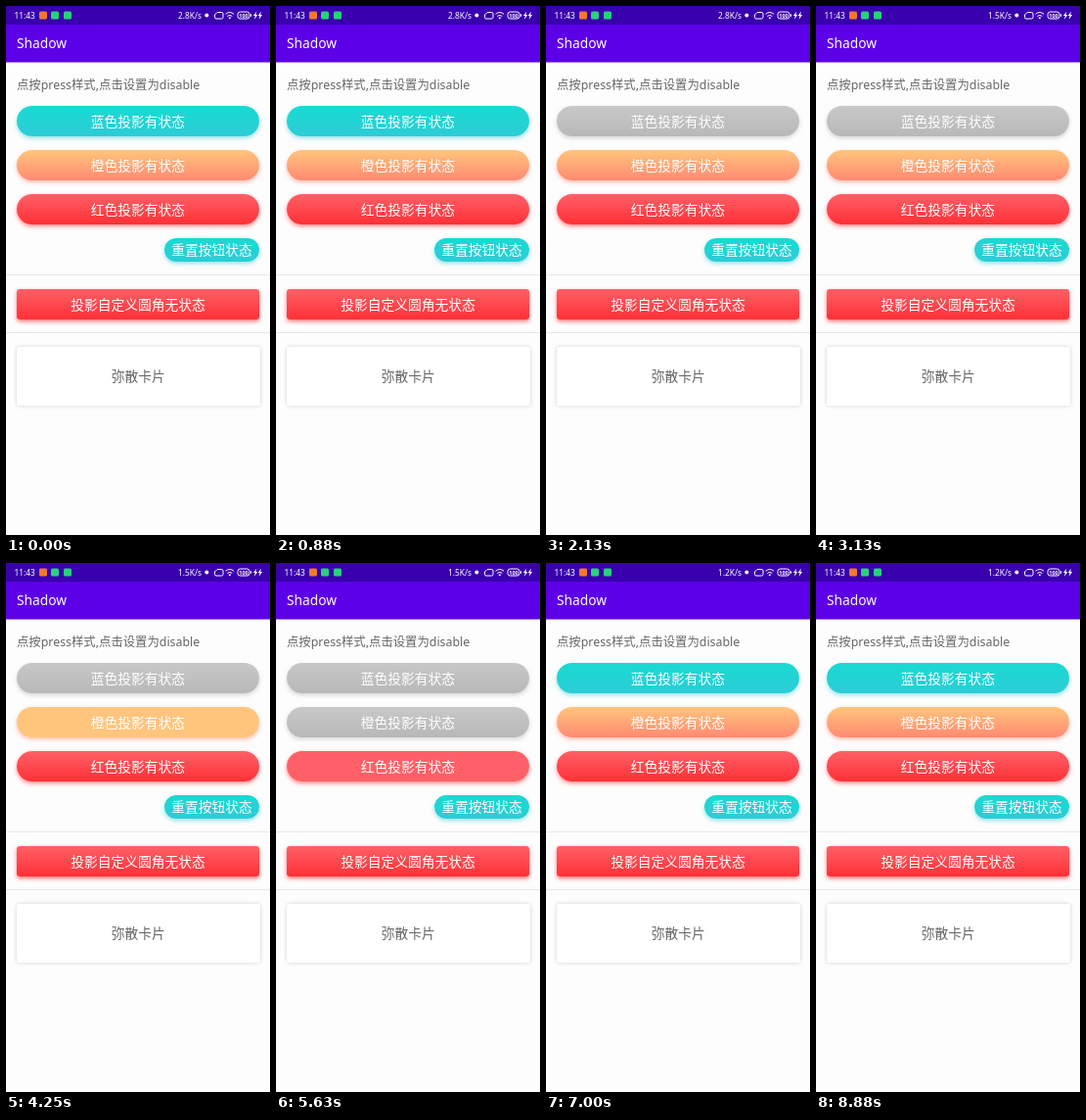
An HTML page for the animation above (9.01 s loop, 270x540 px).

```html
<!DOCTYPE html>
<html lang="zh-CN">
<head>
<meta charset="utf-8">
<title>Shadow</title>
<style>
  html, body { margin: 0; width: 100%; height: 100%; overflow: hidden; background: #fdfdfd; }
  body { position: relative; font-family: "Noto Sans", "Noto Sans CJK SC", "Noto Sans CJK", sans-serif; }
  svg, .box { position: absolute; }
  svg { left: 0; top: 0; }
  .box {
    box-sizing: border-box; text-align: center; white-space: nowrap;
    font-size: 13.75px; color: #fff;
    background: linear-gradient(var(--top), var(--bottom));
    box-shadow: 0 2px 4px var(--shadow);
  }
  .blue   { --top: #18dad2; --bottom: #2dccd6; --shadow: #2dccd680; }
  .orange { --top: #ffc57c; --bottom: #ff8a72; --shadow: #ff8a7290; }
  .red    { --top: #ff6067; --bottom: #ff3036; --shadow: #ff303690; }
  .square { --shadow: #ff3036b0; }
  .card   { --top: #fff; --bottom: #fff; color: #666; box-shadow: 0 0 4px #0000002e; }
  .pressed  { --bottom: var(--top); }
  .disabled { --top: #c8c8c8; --bottom: #b8b8b8; --shadow: #b8b8b890; }
</style>
</head>
<body>
<svg width="270" height="540" fill="#fff">
  <rect width="270" height="20" fill="#3900ae"/>
  <rect y="19" width="270" height="38.5" fill="#5c00e8"/>
  <g font-size="8.3" font-weight="500">
    <text x="8.5" y="12.6">11:43</text>
    <text id="speed" x="200" y="12.6" text-anchor="end"></text>
  </g>
  <rect x="34" y="5.5" width="8" height="8" rx="1.5" fill="#f0792b"/>
  <rect x="46" y="5.5" width="8" height="8" rx="1.5" fill="#28d17c"/>
  <rect x="59" y="5.5" width="8" height="8" rx="1.5" fill="#28d17c"/>
  <circle cx="205.3" cy="9.5" r="2"/>
  <g fill="none" stroke="#fff">
    <path d="M216 6.5h4.5q1.5 0 1.5 1.5v3.5q0 1.5-1.5 1.5h-5.5q-1.5 0-1.5-1.5v-2.5z"/>
    <path d="M224.5 8.3q4.3-3.6 8.6 0M226.3 10.4q2.5-2 5 0"/>
    <rect x="237" y="6" width="12" height="7" rx="2.5"/>
  </g>
  <circle cx="228.8" cy="12.2" r="1"/>
  <rect x="250" y="8.2" width="1" height="2.6"/>
  <text x="243" y="11.6" font-size="5.5" font-weight="600" text-anchor="middle">100</text>
  <path id="bolt" d="M256.3 5.5l-3.3 4.6h1.8l-.8 3.6 3.4-4.8h-1.9z"/>
  <use href="#bolt" x="4.7"/>
  <text x="11" y="43.4" font-size="13.75" font-weight="500">Shadow</text>
  <text x="11" y="84.6" font-size="12.375" fill="#666">点按press样式,点击设置为disable</text>
  <path d="M0 274.5h270M0 333.5h270" stroke="#e7e7e7"/>
</svg>
<script>
const LOOP = 9010, RESET = 6880;

function addBox(kind, label, x, y, w, h, radius) {
  const el = document.createElement("div");
  el.textContent = label;
  el.className = "box " + kind;
  el.style.cssText = `left:${x}px;top:${y}px;width:${w}px;height:${h}px;` +
    `line-height:${h}px;border-radius:${radius}px`;
  document.body.append(el);
  return el;
}

// Each button is pressed, then released; released colour buttons stay disabled until the reset.
const buttons = [
  { el: addBox("blue", "蓝色投影有状态", 11, 102, 248, 31, 15.5), press: 1130, release: 2000 },
  { el: addBox("orange", "橙色投影有状态", 11, 147, 248, 31, 15.5), press: 3750, release: 4630 },
  { el: addBox("red", "红色投影有状态", 11, 191.5, 248, 31, 15.5), press: 5250, release: 6130 },
  { el: addBox("blue", "重置按钮状态", 162, 236.5, 97, 24.5, 12.25), press: 6500, release: RESET },
];
addBox("red square", "投影自定义圆角无状态", 11, 289, 248, 31, 3);
addBox("card", "弥散卡片", 11, 348, 248.5, 60, 3);

const speed = document.getElementById("speed");

function draw(t) {
  for (const { el, press, release } of buttons) {
    el.classList.toggle("pressed", t >= press && t < release);
    el.classList.toggle("disabled", t >= release && t < RESET);
  }
  speed.textContent = (t < 2500 ? "2.8" : t < 6500 ? "1.5" : "1.2") + "K/s";
}

const start = performance.now();
function tick() {
  draw((performance.now() - start) % LOOP);
  requestAnimationFrame(tick);
}
tick();
</script>
</body>
</html>
```
